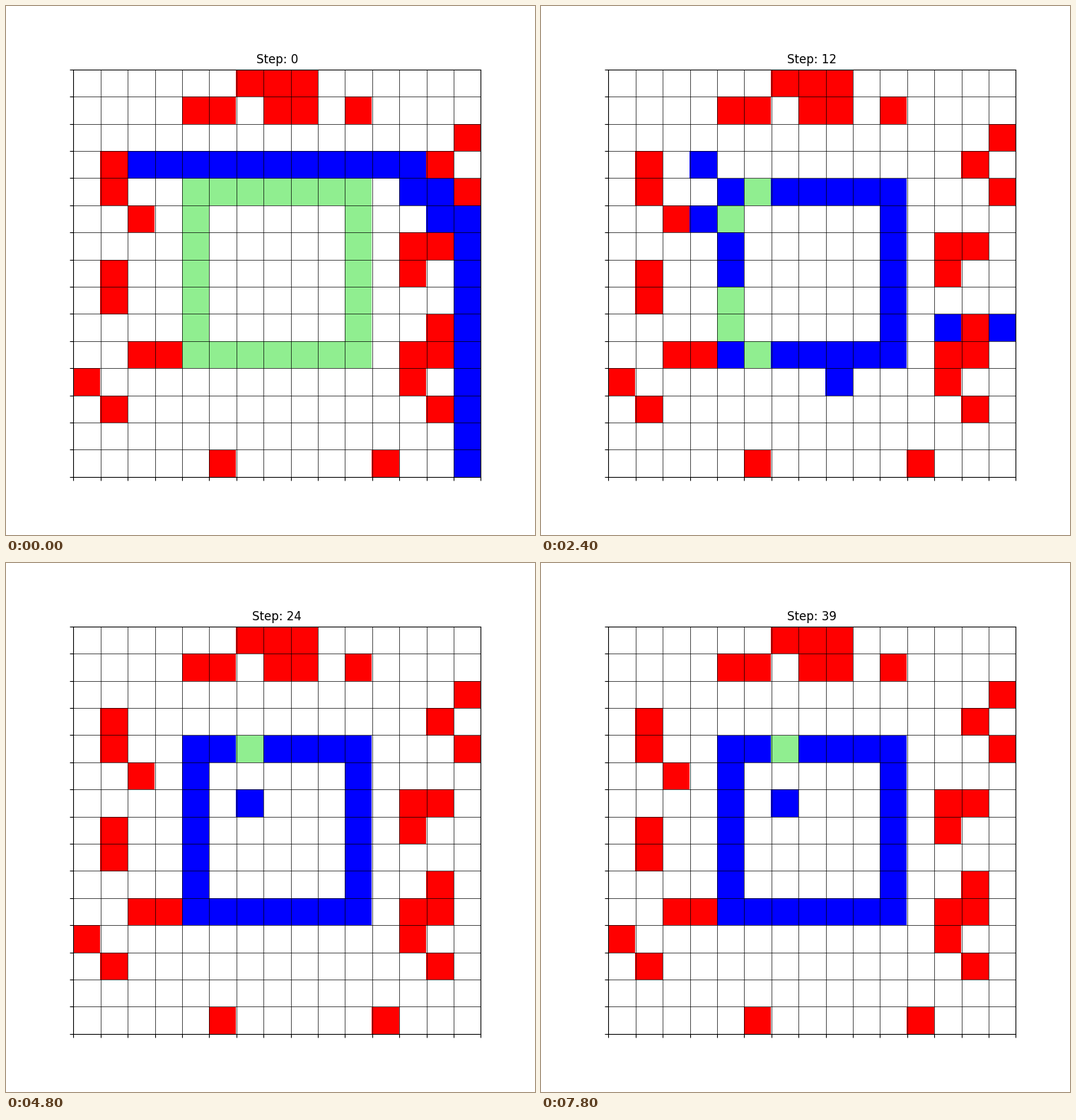
Recreate the animation shown at these times as a matplotlib script. Size 748 px wide and 748 px high, loop 8 s.

```python
import itertools
import math

import matplotlib.pyplot as plt
import numpy as np
from matplotlib.animation import FuncAnimation
from matplotlib.colors import ListedColormap

SIZE, STEPS = 15, 40
EMPTY, WALL, AGENT, GOAL = range(4)
COLORS = ListedColormap(["white", "red", "blue", "lightgreen"])

WALL_COLS = {0: (6, 7, 8), 1: (4, 5, 7, 8, 10), 2: (14,), 3: (1, 13),
             4: (1, 14), 5: (2,), 6: (12, 13), 7: (1, 12), 8: (1,),
             9: (13,), 10: (2, 3, 12, 13), 11: (0, 12), 12: (1, 13),
             14: (5, 11)}
WALLS = {(r, c) for r, cols in WALL_COLS.items() for c in cols}

# Square outline to fill, clockwise from its top left corner
RING = ([(4, c) for c in range(4, 11)] + [(r, 10) for r in range(5, 11)]
        + [(10, c) for c in range(9, 3, -1)] + [(r, 4) for r in range(9, 4, -1)])

START = ([(3, c) for c in range(2, 13)] + [(4, 12), (4, 13), (5, 13)]
         + [(r, 14) for r in range(5, 15)])


def formation(holes, strays):
    return [cell for i, cell in enumerate(RING) if i not in holes] + strays


# Step -> cells held by the agents
KEYS = {
    4: formation({1, 9, 10, *range(13, 22), 23},
                 [(3, 4), (3, 10), (5, 5), (7, 8), (8, 9), (8, 12), (8, 13),
                  (10, 14), (11, 10), (11, 11), (12, 12), (13, 14), (14, 13)]),
    8: formation({1, 9, *range(17, 22), 23},
                 [(3, 4), (6, 3), (6, 6), (7, 11), (10, 11), (11, 10),
                  (11, 14), (12, 11)]),
    12: formation({1, 17, 19, 20, 23},
                  [(3, 3), (5, 3), (9, 12), (9, 14), (11, 8)]),
    20: formation({2, 17}, [(6, 5), (11, 7)]),
    24: formation({2}, [(6, 6)]),
    25: formation({2}, [(7, 6)]),
    26: formation({2}, [(6, 5)]),
}
LOOP = [(6, 5), (5, 5), (6, 6)]
for s in range(27, STEPS):
    KEYS[s] = formation({2}, [LOOP[(s - 28) % 3]])


def neighbours(cell):
    for dr, dc in itertools.product((-1, 0, 1), repeat=2):
        r, c = cell[0] + dr, cell[1] + dc
        if (dr or dc) and 0 <= r < SIZE and 0 <= c < SIZE and (r, c) not in WALLS:
            yield r, c


def distances(goal):
    """Number of moves from every free cell to the goal."""
    dist, queue = {goal: 0}, [goal]
    for cell in queue:
        for n in neighbours(cell):
            if n not in dist:
                dist[n] = dist[cell] + 1
                queue.append(n)
    return dist


def assign(cost):
    """Hungarian method: the best column for each row."""
    n = len(cost)
    u, v = [0.0] * (n + 1), [0.0] * (n + 1)
    match, way = [0] * (n + 1), [0] * (n + 1)
    for i in range(1, n + 1):
        match[0], j0 = i, 0
        low, used = [math.inf] * (n + 1), [False] * (n + 1)
        while True:
            used[j0] = True
            i0, delta, j1 = match[j0], math.inf, 0
            for j in range(1, n + 1):
                if used[j]:
                    continue
                cur = cost[i0 - 1][j - 1] - u[i0] - v[j]
                if cur < low[j]:
                    low[j], way[j] = cur, j0
                if low[j] < delta:
                    delta, j1 = low[j], j
            for j in range(n + 1):
                if used[j]:
                    u[match[j]] += delta
                    v[j] -= delta
                else:
                    low[j] -= delta
            j0 = j1
            if match[j0] == 0:
                break
        while j0:
            match[j0] = match[way[j0]]
            j0 = way[j0]
    result = [0] * n
    for j in range(1, n + 1):
        result[match[j] - 1] = j - 1
    return result


def walk(cells, goals, steps):
    """Yield the agents' cells for each step on the way to the goals."""
    fields = [distances(g) for g in goals]
    cost = [[f[c] ** 0.9 if f[c] <= steps else 1000 for f in fields]
            for c in cells]
    pick = assign(cost)
    cells = list(cells)
    for left in range(steps, 0, -1):
        order = sorted(range(len(cells)), key=lambda a: fields[pick[a]][cells[a]])
        for a in order:
            field, goal = fields[pick[a]], goals[pick[a]]
            d = field[cells[a]]
            if d == 0:
                continue
            options = sorted((n for n in neighbours(cells[a]) if field[n] == d - 1),
                             key=lambda n: math.dist(n, goal))
            free = [n for n in options if n not in cells]
            if free:
                cells[a] = free[0]
            elif d >= left:
                cells[a] = options[0]
        yield list(cells)


def plan():
    path, now = [list(START)], 0
    for step, goals in KEYS.items():
        path.extend(walk(path[-1], goals, step - now))
        now = step
    return path


def board(cells):
    grid = np.full((SIZE, SIZE), EMPTY)
    for kind, group in ((GOAL, RING), (WALL, WALLS), (AGENT, cells)):
        for cell in group:
            grid[cell] = kind
    return grid


PATH = plan()

fig, ax = plt.subplots(figsize=(7.48, 7.48), dpi=100)
image = ax.imshow(board(START), cmap=COLORS, vmin=0, vmax=3,
                  interpolation="nearest")
edges = np.arange(SIZE + 1) - 0.5
ax.set_xticks(edges, [])
ax.set_yticks(edges, [])
ax.grid(color="black", linestyle="-", linewidth=0.5)
title = ax.set_title("Step: 0")


def update(step):
    image.set_data(board(PATH[step]))
    title.set_text(f"Step: {step}")
    return image, title


anim = FuncAnimation(fig, update, frames=STEPS, interval=200, repeat=True,
                     repeat_delay=0, blit=False)
plt.show()
```
